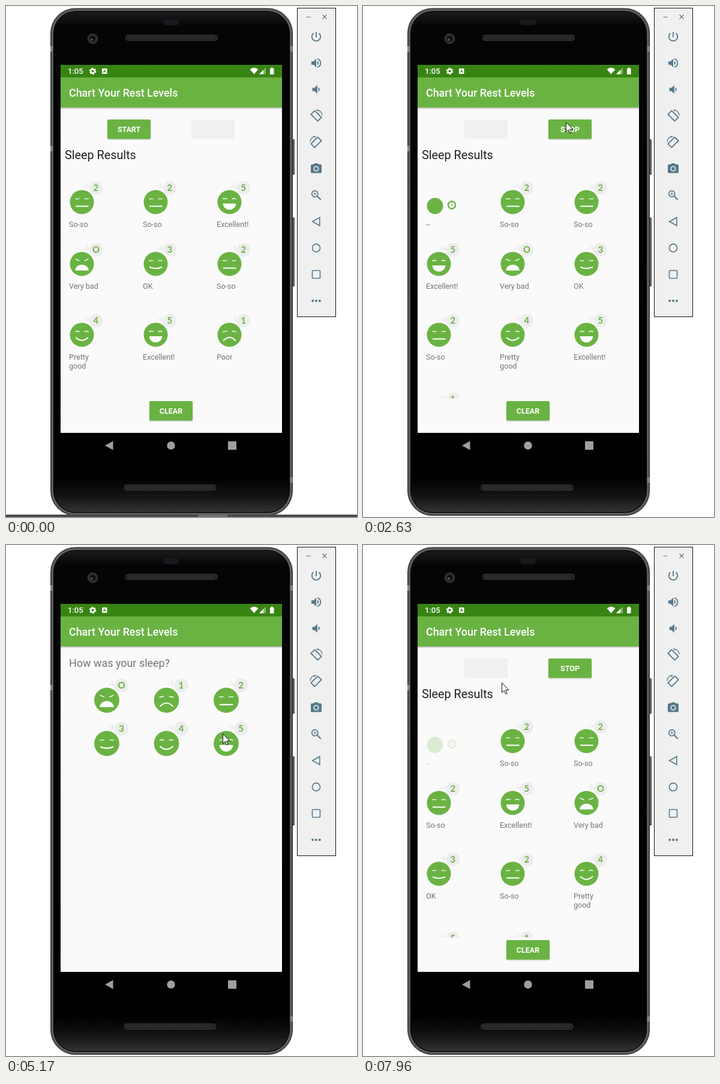
Write an HTML page that moves like this. It is 585x851 px and loops after 8000 ms.

```html
<!DOCTYPE html>
<html lang="en">
<head>
<meta charset="utf-8">
<title>Sleep log</title>
<style>
html, body { margin: 0; width: 100%; height: 100%; overflow: hidden; background: #fff; }
svg { display: block; width: 100%; height: 100%; }
text { font-family: Roboto, "Open Sans", sans-serif; }
.digit { font-family: Lato, sans-serif; font-weight: 700; }
</style>
</head>
<body>
<svg id="stage" viewBox="0 0 585 851"></svg>
<script>
const LOOP = 8000;
const GREEN = '#6ab343';
const LABELS = ['Very bad', 'Poor', 'So-so', 'OK', 'Pretty good', 'Excellent!'];
const SCORES = [2, 2, 5, 0, 3, 2, 4, 5, 1];
const ROWS = [0, 103, 221, 339];
const DROP = 13; // how far the last row sits lower while a night is running

// Moments of the scene, in ms
const T = {
  stripOff: 130, disable1: 1600, insert1: 1710, leave: 4428, slide: 400,
  back: 5840, listBack: 5940, disable2: 7520, insert2: 7675, move: 250, add: 120
};

// time, x, y of the pointer tip
const POINTER = [
  [130, 345, 851], [920, 226, 269], [1200, 206, 203], [1480, 206, 203], [1690, 243, 286],
  [1860, 270, 280], [2460, 337, 198], [2630, 338, 193], [2860, 340, 195], [3010, 341, 196],
  [3410, 341, 206], [4050, 341, 199], [4110, 329, 196], [4260, 329, 196], [4560, 397, 317],
  [5020, 362, 316], [5170, 361, 314], [5450, 362, 252], [5800, 366, 250], [5950, 400, 240],
  [6190, 310, 330], [6720, 208, 240], [6810, 206, 232], [7110, 205, 197], [7560, 205, 197],
  [7960, 231, 229], [8000, 234, 232]
];

const clamp = v => Math.max(0, Math.min(1, v));
const lerp = (a, b, p) => a + (b - a) * p;
const ease = v => (1 - Math.cos(Math.PI * clamp(v))) / 2;
const $ = id => document.getElementById(id);

const rect = (x, y, w, h, fill, extra = '') =>
  `<rect x="${x}" y="${y}" width="${w}" height="${h}" fill="${fill}" ${extra}/>`;
const circle = (x, y, r, fill, extra = '') =>
  `<circle cx="${x}" cy="${y}" r="${r}" fill="${fill}" ${extra}/>`;
const path = (d, fill, extra = '') => `<path d="${d}" fill="${fill}" ${extra}/>`;
const line = (d, color, width, extra = '') =>
  path(d, 'none', `stroke="${color}" stroke-width="${width}" ${extra}`);
const text = (x, y, size, fill, str, extra = '') =>
  `<text x="${x}" y="${y}" font-size="${size}" fill="${fill}" ${extra}>${str}</text>`;
const group = (body, extra = '') => `<g ${extra}>${body}</g>`;

// Face icon, centred on its green disc
function face(score) {
  const slant = 'M-11-8L-4-5.2M11-8L4-5.2';
  const flat = 'M-11.5-5.4H-4M4-5.4H11.5';
  const arch = 'M-11-4.8Q-7.5-7.2-4-5M11-4.8Q7.5-7.2 4-5';
  const droop = 'M-11.5-4.6L-4-6.2M11.5-4.6L4-6.2';
  const eyes = [slant, droop, flat, flat, arch, arch][score];
  const mouth = [
    path('M-11.2 11A11.2 9.8 0 0 1 11.2 11Z', '#fff'),
    line('M-10.5 10Q0-1 10.5 10', '#fff', 2),
    line('M-10.5 7H11', '#fff', 2.1),
    line('M-10.5 5.2Q0 9.8 10.5 5.2', '#fff', 2.1),
    line('M-10.5 4.5Q0 14 10.5 4.5', '#fff', 2.1),
    path('M-10.8 2.4H10.8A10.8 10.4 0 0 1-10.8 2.4Z', '#fff')
  ][score];
  const dots = [[4.5, -25.5, 1.8], [8.5, -29.5, 1.8], [9.8, -25, 2.4]]
    .map(([x, y, r]) => circle(x, y, r, '#ededed')).join('');
  return circle(0, 0, 20, GREEN) + line(eyes, '#fff', 1.4) + mouth + dots +
    circle(23.5, -23.5, 11.2, '#ededed') +
    text(23.4, -18.2, 14.8, GREEN, score || 'O', 'class="digit" text-anchor="middle"');
}

const label = score => (score === 4 ? LABELS[score].split(' ') : [LABELS[score]])
  .map((s, i) => text(105, 367.5 + 15 * i, 12.55, '#757575', s)).join('');

const rated = score => group(face(score), 'transform="translate(126.5 326.5)"') + label(score);

const running = circle(120, 333, 13.5, GREEN) + circle(148, 331.5, 8, '#eee') +
  circle(148, 331.5, 6, '#fff', `stroke="${GREEN}" stroke-width="2.4"`) +
  line('M148 328V332L150.5 333.5', GREEN, 1.3) + text(105, 367.5, 12.55, '#757575', '--');

function button(id, x, y, str) {
  const caption = (color, key) =>
    text(x + 36, y + 21.3, 12.5, color, str, `${key} font-weight="700" text-anchor="middle"`);
  const on = rect(x, y + 1.5, 72, 32, '#000', 'rx="2" opacity=".2" filter="url(#soft)"') +
    rect(x, y, 72, 32.5, GREEN, 'rx="1.8"') + caption('#fff', '');
  const off = rect(x, y, 72, 32.5, '#eff0f0', 'rx="1.8"') + caption('#e3e5e5', `id="${id}Ghost"`);
  return group(off, `id="${id}Off"`) + group(on, `id="${id}On"`);
}

function phone() {
  const key = (y, h) => rect(476, y, 5, h, '#4b4b4d', 'rx="1.5"') +
    line(`M479.5 ${y + 2}v${h - 4}`, '#8a8a8c', 1, 'stroke-dasharray="2 1"');
  const grille = (x, y) => rect(x, y, 153, 9, '#202021', 'rx="4" stroke="#3d3d3f"') +
    line(`M${x + 4} ${y + 4.5}h145`, '#3a3a3b', 5, 'stroke-dasharray="1 1.5"');
  const bands = [[74, 67], [473, 67], [74, 233], [473, 785]]
    .map(([x, y]) => rect(x, y, 4.5, 9, '#88898b')).join('');
  return key(222, 59) + key(352, 115) + rect(475, 585, 3, 41, '#555') +
    rect(74.5, 4, 403, 844.5, '#505153', 'rx="41" stroke="#29292a"') + bands +
    rect(77.5, 7, 397, 838.5, 'none', 'rx="38.5" stroke="#737476" stroke-width="1"') +
    rect(79.5, 9, 393, 834.5, 'url(#body)', 'rx="37" stroke="#0b0b0b" stroke-width="1.5"') +
    rect(262, 22, 26, 10, '#16191d', 'rx="4.5"') +
    circle(144.5, 54.5, 8.3, '#2c2c2e', 'stroke="#3c3c3e"') + circle(144.5, 54.5, 4.6, '#0c0d10') +
    circle(143, 56, 2, '#55575b') + grille(199.5, 48.5) + grille(197, 797.5) +
    path('M165 732L178.5 724.5V739.5Z', '#9f9f9f') + circle(275, 732, 6.7, '#9f9f9f') +
    rect(370, 725, 14, 14, '#9f9f9f', 'rx="1"');
}

function bars() {
  return rect(91, 98, 369, 21, '#388413') +
    text(103, 113.3, 13, '#fff', '1:05', 'font-weight="500"') +
    circle(144.5, 108.5, 3.3, 'none', 'stroke="#fff" stroke-width="2.4"') +
    circle(144.5, 108.5, 5, 'none', 'stroke="#fff" stroke-width="1.6" stroke-dasharray="2.6 2.636"') +
    rect(160, 104, 8.5, 9, '#fff', 'rx="1"') +
    text(164.2, 111.3, 7.5, '#388413', 'A', 'font-weight="700" text-anchor="middle"') +
    path('M406.5 105.5Q413.5 100 420.5 105.5L413.5 113.5Z', '#fff') +
    path('M422 113.5L433 102.5V113.5Z', '#fff', 'opacity=".4"') +
    path('M422 113.5L429 106.5V113.5Z', '#fff') +
    path('M440 104H442V102.5H444.5V104H446.5V114H440Z', '#fff') +
    rect(91, 169, 369, 3.5, 'url(#shade)') + rect(91, 119, 369, 50, GREEN) +
    text(105, 151, 17.9, '#fff', 'Chart Your Rest Levels', 'font-weight="500"') +
    rect(91, 710, 369, 1, '#e2e2e2');
}

function toolPanel() {
  const ink = '#56788a';
  const rotate = line('M9.2 2.3L21.7 14.8 14.8 21.7 2.3 9.2Z', ink, 2, 'stroke-linejoin="round"') +
    line('M13 .8Q21.8 1.8 23.2 11', ink, 1.5) + path('M11.3 0L16.5 2.5 15.2 3.9Z', ink);
  const icons = [
    path('M13 3h-2v10h2V3zm4.83 2.17l-1.42 1.42C17.99 7.86 19 9.81 19 12c0 3.87-3.13 7-7 7s-7-3.13-7-7c0-2.19 1.01-4.14 2.58-5.42L6.17 5.17C4.23 6.82 3 9.26 3 12c0 4.97 4.03 9 9 9s9-4.03 9-9c0-2.74-1.23-5.18-3.17-6.83z', ink),
    path('M3 9v6h4l5 5V4L7 9ZM14 8v8Q16.5 15 16.5 12T14 8Z', ink) + line('M14 4.3A7.9 7.9 0 0 1 14 19.7', ink, 2),
    path('M5 9v6h4l5 5V4L9 9ZM16 8v8Q18.5 15 18.5 12T16 8Z', ink),
    rotate,
    group(rotate, 'transform="matrix(-1 0 0 1 24 0)"'),
    path('M9 2L7.2 4H4Q2 4 2 6V18Q2 20 4 20H20Q22 20 22 18V6Q22 4 20 4H16.8L15 2Z', ink) +
      circle(12, 12, 4.1, ink, 'stroke="#f0f0f0" stroke-width="1.8"'),
    circle(9.5, 9.5, 5.6, 'none', `stroke="${ink}" stroke-width="1.9"`) +
      line('M14 14L20.5 20.5', ink, 2.4) + line('M6.7 9.5H12.3M9.5 6.7V12.3', ink, 1.3),
    line('M5 12L18.5 4.5V19.5Z', ink, 1.8),
    circle(12, 12, 7.3, 'none', `stroke="${ink}" stroke-width="1.8"`),
    rect(4.8, 4.8, 14.4, 14.4, 'none', `rx="1" stroke="${ink}" stroke-width="1.8"`),
    [5.5, 12, 18.5].map(x => circle(x, 12, 2.2, ink)).join('')
  ];
  return rect(485.5, 3.5, 64, 514, '#f0f0f0', 'stroke="#111"') +
    line('M500.5 18.5H507.5M527.5 14.5L534.5 21.5M534.5 14.5L527.5 21.5', '#6b7780', 1.2) +
    icons.map((icon, i) => group(icon, `transform="translate(506.2 ${40.2 + 44 * i}) scale(.9)"`)).join('');
}

function question() {
  const faces = LABELS.map((_, i) => group(face(i),
    `transform="translate(${168 + i % 3 * 99.5} ${258.5 + Math.floor(i / 3) * 72}) scale(1.045)"`));
  return text(105, 203, 17.95, '#757575', 'How was your sleep?') + faces.join('');
}

// Newest first; the two inserted nights lead the list
const nights = [null, 2, ...SCORES];
const night = (score, i) => group(
  i === 0 ? running
    : i === 1 ? group(running, 'id="open"') + group(rated(score), 'id="closed"')
      : rated(score), `id="night${i}"`);

$('stage').innerHTML = `<defs>
  <linearGradient id="body" x2="0" y2="1">
    <stop stop-color="#1b1b1c"/><stop offset=".03" stop-color="#050505"/>
    <stop offset=".93"/><stop offset=".97" stop-color="#151515"/><stop offset="1" stop-color="#343435"/>
  </linearGradient>
  <linearGradient id="shade" x2="0" y2="1">
    <stop stop-color="#000" stop-opacity=".25"/><stop offset="1" stop-color="#000" stop-opacity="0"/>
  </linearGradient>
  <filter id="soft"><feGaussianBlur stdDeviation="1"/></filter>
  <clipPath id="screen">${rect(91, 98, 369, 613, '#000')}</clipPath>
  <clipPath id="list">${rect(91, 262, 369, 391.5, '#000')}</clipPath>
</defs>` + phone() +
  group(rect(91, 98, 369, 613, '#fafafa') +
    group(button('start', 169, 189, 'START') + button('stop', 309, 189, 'STOP') +
      button('clear', 239, 658, 'CLEAR') +
      text(98, 255.3, 19.8, '#212121', 'Sleep Results', 'id="heading"') +
      group(nights.map(night).join(''), 'id="nights" clip-path="url(#list)"'), 'id="home"') +
    group(question(), 'id="ask"') + bars(), 'clip-path="url(#screen)"') +
  toolPanel() +
  group(rect(0, 847, 585, 4, '#4b4b4d') + rect(320, 847, 49, 4, '#717173'), 'id="strip"') +
  path('M.5.5V16.8L4.2 13.3 6.9 19 9.2 18 6.6 12.4H11.8Z', '#fff', 'id="pointer" stroke="#111" stroke-width="1"');

const show = (id, on) => $(id).setAttribute('display', on ? 'inline' : 'none');
const fade = (id, v) => $(id).setAttribute('opacity', v);
const place = (id, x, y) => $(id).setAttribute('transform', `translate(${x} ${y})`);

function slot(k, drop) {
  const row = Math.floor(k / 3);
  return [k % 3 * 123, ROWS[row] + (row === 3 ? drop : 0)];
}

function pointerAt(t) {
  const i = Math.max(1, POINTER.findIndex(k => k[0] >= t));
  const [a, b] = [POINTER[i - 1], POINTER[i]];
  const p = ease((t - a[0]) / (b[0] - a[0]));
  return [lerp(a[1], b[1], p), lerp(a[2], b[2], p)];
}

function update(t) {
  const home = t < T.leave || t >= T.back;
  show('home', home);
  show('ask', !home);
  place('ask', 369 * (1 - ease((t - T.leave) / T.slide)), 0);

  const second = t >= T.back;
  const disabled = second ? T.disable2 : T.disable1;
  const tracking = t >= disabled;
  show('startOn', !tracking);
  show('startOff', tracking);
  show('stopOn', tracking);
  show('stopOff', !tracking);
  fade('startGhost', clamp(1 - (t - disabled) / 180));
  fade('stopGhost', 0);

  show('heading', t < T.leave || t >= T.listBack);
  fade('nights', second ? clamp((t - T.listBack + 40) / 100) : 1);
  show('open', !second);
  show('closed', second);

  const insert = second ? T.insert2 : T.insert1;
  const moved = ease((t - insert) / T.move);
  const added = ease((t - insert - T.move) / T.add);
  const fresh = second ? 0 : 1;
  nights.forEach((_, i) => {
    const id = 'night' + i;
    show(id, i >= fresh);
    if (i < fresh) return;
    const k = i - fresh;
    fade(id, k ? 1 : added);
    const to = slot(k, DROP);
    const from = k ? slot(k - 1, 0) : to;
    place(id, lerp(from[0], to[0], moved), lerp(from[1], to[1], moved));
  });

  show('strip', t < T.stripOff);
  show('pointer', t >= T.stripOff);
  place('pointer', ...pointerAt(t));
}

const begin = performance.now();
function tick() {
  update((performance.now() - begin) % LOOP);
  requestAnimationFrame(tick);
}
tick();
</script>
</body>
</html>
```
